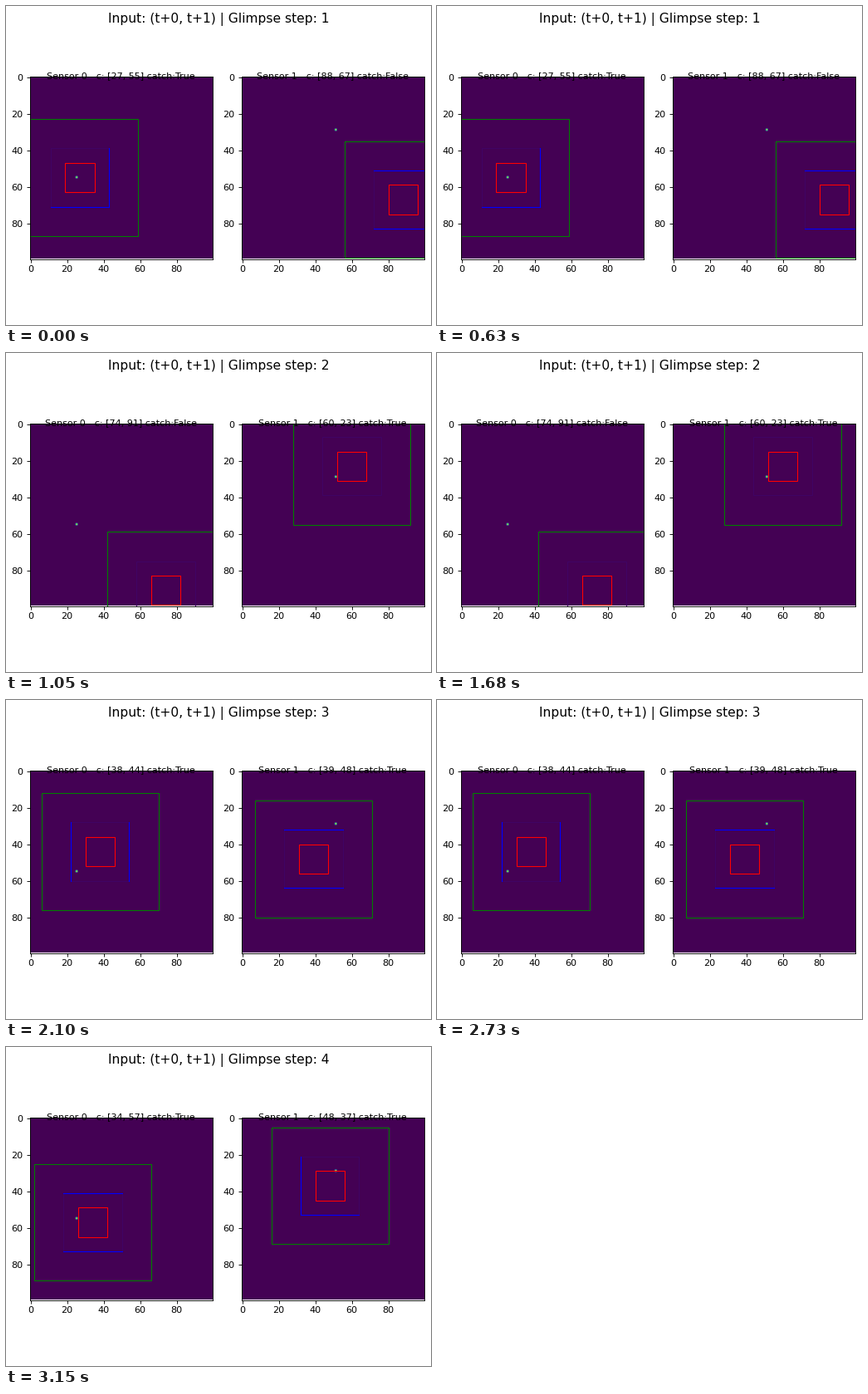
Write a matplotlib script that moves like this. It is 512 by 384 pixels and loops after 4200 ms.

```python
import matplotlib.pyplot as plt
import numpy as np
from matplotlib.animation import FuncAnimation
from matplotlib.patches import Rectangle

WIDTH, HEIGHT, DPI = 512, 384, 80
SIDE = 220            # plot size in pixels
GRID = 100            # cells per side
STEP_MS = 1050
FAINT_BLUE = "#400464"

# Per sensor: left edge in pixels, lit cell, and for each glimpse
# its centre, whether it made a catch, and its bright blue sides.
SENSORS = [
    dict(left=28.5, dot=(25, 55), glimpses=[
        ((27, 55), True, "rb"),
        ((74, 91), False, ""),
        ((38, 44), True, "lr"),
        ((34, 57), True, "tb"),
    ]),
    dict(left=283.5, dot=(51, 29), glimpses=[
        ((88, 67), False, "tb"),
        ((60, 23), True, ""),
        ((39, 48), True, "tb"),
        ((48, 37), True, "lb"),
    ]),
]

plt.rcParams["font.family"] = "DejaVu Sans"
fig = plt.figure(figsize=(WIDTH / DPI, HEIGHT / DPI), dpi=DPI)
heading = fig.suptitle("", fontsize=14)
bottom = HEIGHT - 84.5 - SIDE
axes = [fig.add_axes([s["left"] / WIDTH, bottom / HEIGHT,
                      SIDE / WIDTH, SIDE / HEIGHT]) for s in SENSORS]


def draw_box(ax, centre, size, color):
    x, y = (c - size / 2 for c in centre)
    ax.add_patch(Rectangle((x, y), size, size, fill=False,
                           edgecolor=color, linewidth=1))


def draw_sides(ax, centre, size, sides, color):
    half = size / 2
    left, right = centre[0] - half, centre[0] + half
    top, base = centre[1] - half, centre[1] + half
    ends = {"l": ([left, left], [top, base]),
            "r": ([right, right], [top, base]),
            "t": ([left, right], [top, top]),
            "b": ([left, right], [base, base])}
    for side in sides:
        ax.plot(*ends[side], color=color, linewidth=1, zorder=1)


def draw_sensor(ax, index, step):
    sensor = SENSORS[index]
    centre, caught, sides = sensor["glimpses"][step]
    field = np.zeros((GRID, GRID))
    col, row = sensor["dot"]
    field[row, col] = 1

    ax.clear()
    ax.imshow(field, cmap="viridis")
    ax.autoscale(False)
    ax.set_xticks(range(0, GRID, 20))
    ax.set_yticks(range(0, GRID, 20))
    draw_box(ax, centre, 64, "g")
    draw_box(ax, centre, 32, FAINT_BLUE)
    draw_sides(ax, centre, 32, sides, "b")
    draw_box(ax, centre, 16, "r")
    ax.set_title(f"Sensor {index} - c: {list(centre)} catch:{caught}",
                 fontsize=10, y=0.96)


def update(step):
    heading.set_text(f"Input: (t+0, t+1) | Glimpse step: {step + 1}")
    for index, ax in enumerate(axes):
        draw_sensor(ax, index, step)


anim = FuncAnimation(fig, update, frames=4, interval=STEP_MS,
                     init_func=lambda: update(0), repeat=True, repeat_delay=0)
plt.show()
```
